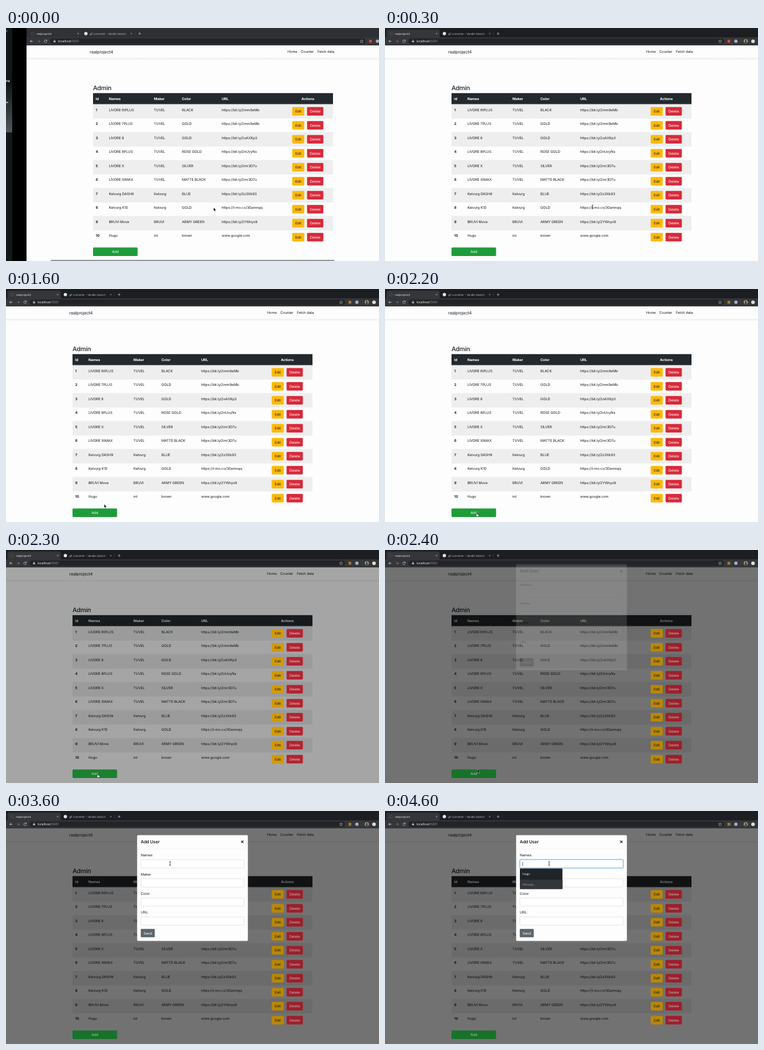
Recreate the animation shown at these times as an HTML page. Size 600x375 px, loop 5 s.

```html
<!DOCTYPE html>
<html lang="en">
<head>
<meta charset="utf-8">
<title>Admin table</title>
<style>
html, body { margin: 0; width: 100%; height: 100%; overflow: hidden; background: #000; }
svg { display: block; width: 100vw; height: 100vh; }
text {
  font-family: Inter, "Liberation Sans", sans-serif;
  letter-spacing: -.02em;
  text-rendering: geometricPrecision;
  white-space: pre;
}
</style>
</head>
<body>
<svg id="stage" viewBox="0 0 600 375" xmlns="http://www.w3.org/2000/svg"></svg>
<script>
const LOOP = 5000, STEP = 100;
const INK = '#1d2125';

const rect = (x, y, w, h, fill, extra = '') =>
  `<rect x="${x}" y="${y}" width="${w}" height="${h}" fill="${fill}" ${extra}/>`;
const circle = (x, y, r, fill, extra = '') =>
  `<circle cx="${x}" cy="${y}" r="${r}" fill="${fill}" ${extra}/>`;
const line = (d, color, width = .7, extra = '') =>
  `<path d="${d}" fill="none" stroke="${color}" stroke-width="${width}" ${extra}/>`;
const text = (x, y, s, size = 5.71, fill = INK, extra = '') =>
  `<text x="${x}" y="${y}" font-size="${size}" fill="${fill}" ${extra}>${s}</text>`;
const group = (id, body) => `<g id="${id}">${body}</g>`;
const bold = 'font-weight="700"', mid = 'text-anchor="middle"';

const button = (x, y, w, label, fill, color) =>
  rect(x, y, w, 13.6, fill, 'rx="1.4"') + text(x + w / 2, y + 8.9, label, 5.71, color, mid);

const rows = [
  ['LIVORE 6tPLUS', 'TUVEL', 'BLACK', 'https://bit.ly/2mm9eMb'],
  ['LIVORE 7PLUS', 'TUVEL', 'GOLD', 'https://bit.ly/2mm9eMb'],
  ['LIVORE 8', 'TUVEL', 'GOLD', 'https://bit.ly/2oAXKp3'],
  ['LIVORE 8PLUS', 'TUVEL', 'ROSE GOLD', 'https://bit.ly/2nUvyNs'],
  ['LIVORE X', 'TUVEL', 'SILVER', 'https://bit.ly/2mr3D7u'],
  ['LIVORE XtMAX', 'TUVEL', 'MATTE BLACK', 'https://bit.ly/2mr3D7u'],
  ['Kelvurg DASH9', 'Kelvurg', 'BLUE', 'https://bit.ly/2z3Xb93'],
  ['Kelvurg K10', 'Kelvurg', 'GOLD', 'https://t-mo.co/30amnqq'],
  ['BRUVI Move', 'BRUVI', 'ARMY GREEN', 'https://bit.ly/2YWnyx9'],
  ['Hugo', 'int', 'brown', 'www.google.com']
];
const cols = [132.5, 205, 250, 314];
const rowTop = i => 122.8 + 22.5 * i;

function desktop() {
  return rect(-100, 0, 77, 375, '#12171a') +
    rect(-100, 90, 77, 78, 'url(#panel)') +
    text(-33.5, 5.5, '&lt;', 5, '#eee') +
    text(-33, 86.5, 'PM', 4, '#eee', bold) +
    text(-33, 121, 'er', 4, '#eee', bold) +
    rect(-23, 0, 23, 375, '#000');
}

function browser() {
  const close = x => line(`M${x - 1.2} 7.8l2.4 2.4m0-2.4l-2.4 2.4`, '#c4c6c9', .5);
  return rect(0, 0, 600, 16, '#1c1e21', 'id="strip"') +
    rect(2.5, 2.6, 85.5, 16, '#35363a', 'rx="3" id="tab"') +
    rect(0, 15, 600, 13, '#35363a') +
    rect(37.5, 16.8, 508, 9, '#222427', 'rx="4.5"') +
    circle(9.8, 9, 2.3, 'none', 'stroke="#5c6065" stroke-width=".6"') +
    text(16, 10.6, 'realproject4', 4.4, '#e4e6e8') + close(83) +
    circle(95.5, 9, 2.7, '#dfe3ea') +
    text(101.5, 10.6, 'gif converter - Vandle Search', 4.4, '#b9bcc0') + close(168.5) +
    line('M174.8 6v6', '#55585c', .4) + line('M179.8 9h4.4m-2.2-2.2v4.4', '#d0d2d5', .6) +
    line('M10.4 21.3h-4.4m2-2l-2 2 2 2', '#e0e2e4') +
    line('M17.4 21.3h4.4m-2-2l2 2-2 2', '#808387') +
    line('M32.6 20.4a2.1 2.1 0 1 0 .1 1.6m0-3.2v1.8h-1.8', '#e0e2e4', .6) +
    rect(43.6, 20.7, 3, 2.4, '#c5c8cb', 'rx=".3"') +
    line('M44.2 20.8v-.8a.9.9 0 0 1 1.8 0v.8', '#c5c8cb', .5) +
    text(50.5, 23.1, 'localhost<tspan fill="#9a9da1">:5001</tspan>', 5.2, '#eceef0') +
    line('M539 18.7l.8 1.7 1.9.2-1.4 1.3.4 1.8-1.7-.9-1.7.9.4-1.8-1.4-1.3 1.9-.2z', '#cfd2d5', .5) +
    rect(551, 19, 4.4, 4.6, '#d4482c', 'id="plugin"') +
    circle(564.5, 21.3, 2.7, '#9fb1bf') +
    line('M573 18.5v5.6', '#5a5d61', .4) +
    circle(580.3, 21.3, 3.3, '#a79b84') + circle(580.3, 20.3, 1.2, '#3b3a36') +
    rect(578.4, 21.6, 3.8, 2.3, '#3b3a36', 'rx="1.1"') +
    circle(592, 21.3, 2.9, '#e0ddd6');
}

function page() {
  let s = rect(0, 28, 600, 347, '#fdfdfd') + rect(0, 48.2, 600, 4, 'url(#shade)') +
    text(101.8, 40.7, 'realproject4', 6.9) +
    text(420, 40.4, 'Home') + text(441.3, 40.4, 'Counter') + text(468, 40.4, 'Fetch data') +
    text(107, 99.7, 'Admin', 10, INK, 'font-weight="500"') +
    rect(107, 104.8, 386, 18, '#23292d');
  ['Names', 'Maker', 'Color', 'URL'].forEach((h, i) => s += text(cols[i], 115.8, h, 5.71, '#fff', bold));
  s += text(111.3, 115.8, 'Id', 5.71, '#fff', bold) + text(452.5, 115.8, 'Actions', 5.71, '#fff', bold + mid);
  rows.forEach((row, i) => {
    const y = rowTop(i);
    if (i % 2 == 0) s += rect(107, y, 386, 22.5, '#eee');
    s += rect(107, y, 386, .36, '#dee2e6') + text(111.3, y + 10.9, i + 1, 5.71, INK, bold);
    row.forEach((cell, j) => s += text(cols[j], y + 10.9, cell));
  });
  return s;
}

const buttons = () => rows.map((_, i) =>
  button(427.4, rowTop(i) + 4.5, 19.4, 'Edit', '#fdb90a', INK) +
  button(451.3, rowTop(i) + 4.5, 26.2, 'Delete', '#d72a3b', '#fff')).join('') +
  button(107, 353.3, 71.7, 'Add', '#1f9c3a', '#fff');

function dialog() {
  let s = rect(210.8, 38.8, 178.4, 170.5, '#fdfdfd', 'rx="1.7" stroke="#000" stroke-opacity=".25" stroke-width=".4"') +
    text(216.8, 52, 'Add User', 7, INK, 'font-weight="600"') +
    text(380, 52.4, '×', 8.5, INK, bold + mid) +
    rect(211, 60.9, 178, .4, '#dee2e6');
  ['Names:', 'Maker:', 'Color:', 'URL:'].forEach((label, i) => {
    const y = 30.7 * i;
    s += text(216.8, y + 73.3, label) +
      rect(217, y + 78.4, 166, 13.2, '#fff', 'rx="1.4" stroke="#c6ccd2" stroke-width=".5"');
  });
  return s + button(216.8, 189.7, 22.5, 'Send', '#5d666d', '#fff');
}

const ring = () =>
  rect(216.4, 77.8, 167.2, 14.4, 'none', 'rx="1.9" stroke="#007bff" stroke-opacity=".28" stroke-width="1.2"') +
  rect(217, 78.4, 166, 13.2, 'none', 'rx="1.4" stroke="#78b4fa" stroke-width=".6"');

const suggestions = () =>
  rect(217, 92.4, 68.4, 33.2, '#212426', 'rx="1.2"') +
  rect(217, 110.4, 68.4, 15.2, '#33373b', 'rx="1.2"') +
  text(221.3, 103.2, 'Hugo', 4.8, '#f0f1f2') +
  text(221.3, 120.1, 'Manage...', 4.8, '#8d9297');

const pointers = {
  arrow: '<path d="M0 0v5.6l1.3-1.2.9 2 .9-.4-.9-1.9h1.8z" fill="#000" stroke="#fff" stroke-width=".35"/>',
  beam: line('M-1.2-3.1q1.2 0 1.2 .7q0-.7 1.2-.7M0-2.6v5.2M-1.2 3.1q1.2 0 1.2-.7q0 .7 1.2 .7', '#111', .7),
  hand: '<path d="M0 0q.9-.5 1 .4v2l2.2.5q.8.3.7 1l-.5 2.4h-2.9l-1.7-2.4q0-.7 1.1-.2z" fill="#fff" stroke="#000" stroke-width=".45"/>'
};

// pointer route: time, x, y
const route = [
  [0, 334, 289], [300, 334, 288], [600, 334, 288], [900, 305, 300], [1200, 240, 324],
  [1600, 158, 346.5], [1900, 147, 360], [2300, 147, 360], [2600, 151.5, 340],
  [2900, 176, 282], [3300, 245, 136], [3500, 264, 84.5], [5000, 264, 84.5]
];

const stage = document.getElementById('stage');
stage.innerHTML = `<defs>
  <linearGradient id="shade" x2="0" y2="1"><stop stop-color="#ececec"/><stop offset="1" stop-color="#fdfdfd"/></linearGradient>
  <linearGradient id="panel" x2="0" y2="1"><stop stop-color="#12171a"/><stop offset="1" stop-color="#50565a"/></linearGradient>
  </defs>` +
  group('space', desktop() + page() + rect(0, 28, 600, 347, '#000', 'id="veil"') +
    group('actions', buttons()) + browser() +
    group('modal', dialog() + group('focus', ring()) + group('list', suggestions()) +
      rect(221.3, 82, .6, 6.2, '#222', 'id="caret"'))) +
  rect(72, 373.3, 456, 1.7, '#8a8a8a', 'id="dock"') +
  Object.keys(pointers).map(k => group(k, pointers[k])).join('');

const el = id => document.getElementById(id);
const clamp = v => Math.max(0, Math.min(1, v));
const set = (id, name, value) => el(id).setAttribute(name, value);
const show = (id, on) => set(id, 'opacity', +on);

function pointerAt(t) {
  const i = Math.max(1, route.findIndex(p => p[0] >= t));
  const [a, b] = [route[i - 1], route[i]];
  const p = (t - a[0]) / (b[0] - a[0]);
  return [a[1] + (b[1] - a[1]) * p, a[2] + (b[2] - a[2]) * p];
}

function pointerKind(t) {
  if (t >= 300 && t < 600 || t >= 3500) return 'beam';
  return t >= 1800 && t < 2400 ? 'hand' : 'arrow';
}

function draw(t) {
  const slide = 33 * clamp(1 - t / 300) ** 2;
  set('space', 'transform', `translate(${slide} 0)`);
  set('strip', 'fill', t < 200 ? '#2d2f32' : '#1c1e21');
  set('tab', 'fill', t < 200 ? '#303236' : '#35363a');
  set('plugin', 'fill', t < 600 ? '#d4482c' : '#a8752a');
  show('dock', t < 200);

  const dim = clamp((t - 2205) / 150);
  set('veil', 'opacity', .55 * dim);
  el('actions').style.filter = dim ? `brightness(${1 - .27 * dim})` : 'none';

  const drop = 1 - clamp((t - 2380) / 300);
  set('modal', 'transform', `translate(0 ${-18 * drop * drop})`);
  set('modal', 'opacity', clamp((t - 2380) / 150));
  set('focus', 'opacity', clamp((t - 3620) / 150));
  show('list', t >= 3800);
  show('caret', t >= 3700 && t < 4100 || t >= 4600);

  const [x, y] = pointerAt(t), kind = pointerKind(t);
  for (const k in pointers) {
    show(k, k == kind);
    set(k, 'transform', `translate(${x} ${y})`);
  }
}

function tick() {
  draw(Math.floor(performance.now() % LOOP / STEP) * STEP);
  requestAnimationFrame(tick);
}
tick();
</script>
</body>
</html>
```
